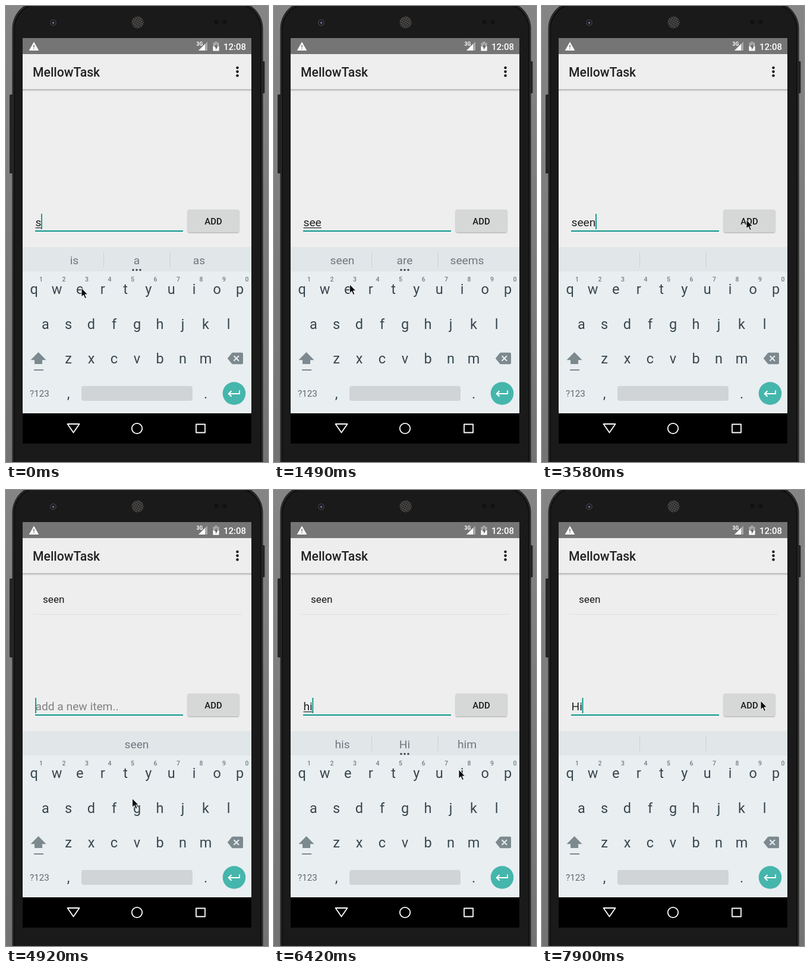
An HTML page that plays this animation: 441x768 px, repeating every 8 s.

```html
<!DOCTYPE html>
<html lang="en">
<head>
<meta charset="utf-8">
<title>Todo list demo</title>
<style>
  html, body { margin: 0; width: 100%; height: 100%; overflow: hidden; background: #7b7b7b; }
  svg { display: block; width: 100%; height: 100%; }
  text { font-family: Roboto, "Noto Sans", sans-serif; white-space: pre; }
  .mid { text-anchor: middle; }
  .key { font-size: 23.5px; fill: #37474f; }
  .digit { font-size: 10.5px; font-weight: 500; fill: #737e83; }
  .word { font-size: 19.2px; fill: #6d797f; }
  .word.bold { font-weight: 700; fill: #37474f; }
</style>
</head>
<body>
<svg id="stage" viewBox="0 0 441 768" xmlns="http://www.w3.org/2000/svg">
  <defs>
    <linearGradient id="drop" x2="0" y2="1">
      <stop stop-color="#000" stop-opacity=".27"/>
      <stop offset="1" stop-color="#000" stop-opacity="0"/>
    </linearGradient>
    <linearGradient id="wall" x2="0" y2="1">
      <stop stop-color="#858585"/>
      <stop offset="1" stop-color="#737373"/>
    </linearGradient>
    <pattern id="mesh" width="3.4" height="3.4" patternUnits="userSpaceOnUse" patternTransform="rotate(30)">
      <rect width="3.4" height="3.4" fill="#4d4b49"/>
      <circle cx="1.7" cy="1.7" r="1.15" fill="#171717"/>
    </pattern>
    <filter id="soft" x="-20%" y="-20%" width="140%" height="140%">
      <feDropShadow dx="0" dy="1" stdDeviation="1" flood-opacity=".32"/>
    </filter>
  </defs>

  <!-- phone body -->
  <rect width="441" height="768" fill="url(#wall)"/>
  <rect x="6" y="149" width="6" height="133" rx="1.5" fill="#262626"/>
  <rect x="430" y="93" width="5.5" height="54" rx="1.5" fill="#262626"/>
  <rect x="10.5" y="-8" width="422" height="830" rx="46" fill="#101010"/>
  <rect x="12" y="-6.5" width="419" height="827" rx="45" fill="none" stroke="#343434" stroke-width="1.5"/>
  <rect x="15" y="-3" width="413" height="820" rx="42" fill="#1a1a1a"/>
  <circle cx="79.5" cy="28" r="5.5" fill="#39393b"/>
  <circle cx="79.5" cy="28" r="3.7" fill="#15161d"/>
  <circle cx="79.5" cy="28.3" r="1.7" fill="#6d7394"/>
  <circle cx="221.5" cy="27.5" r="10" fill="url(#mesh)"/>
  <g fill="#111"><circle cx="354" cy="27" r="3.5"/><circle cx="368" cy="27" r="3.5"/></g>

  <!-- status bar -->
  <rect x="28" y="54" width="385" height="683" fill="#eee"/>
  <rect x="28" y="54" width="385" height="27" fill="#757575"/>
  <path d="M47 60.5L55.3 75H38.7Z" fill="#fff"/>
  <path d="M47 65.5V70M47 71.5V73" stroke="#757575" stroke-width="1.6"/>
  <text x="320.5" y="67" font-size="8.5" font-weight="700" fill="#fff">3G</text>
  <path d="M339 60V75H324Z" fill="#a9a9a9"/>
  <path d="M335 64V75H324Z" fill="#fff"/>
  <path d="M351.5 60H355.5V62H358.5V75.5H348.5V62H351.5Z" fill="#a9a9a9"/>
  <path d="M348.5 68H358.5V75.5H348.5Z" fill="#fff"/>
  <path d="M354.5 63L350.7 69.5H353V74L356.7 67.7H354.5Z" fill="#666"/>
  <text x="366" y="73.5" font-size="15" font-weight="500" fill="#fff">12:08</text>

  <!-- app bar -->
  <rect x="28" y="140" width="385" height="4" fill="url(#drop)"/>
  <text x="45" y="118.7" font-size="21.2" font-weight="500" fill="#212121">MellowTask</text>
  <g fill="#1c1c1c">
    <circle cx="389.5" cy="104" r="2.3"/><circle cx="389.5" cy="110.6" r="2.3"/><circle cx="389.5" cy="117.2" r="2.3"/>
  </g>

  <!-- list and form -->
  <g id="item">
    <path d="M45 209.5H397" stroke="#dfdfdf"/>
    <text x="62" y="189.5" font-size="17.1" fill="#151515">seen</text>
  </g>
  <text id="entry" x="49.5" y="371" font-size="19.2"/>
  <rect id="mark" x="49.5"/>
  <rect id="caret" y="350" width="1.8" height="26" fill="#009688"/>
  <rect x="49" y="378" width="249" height="2" fill="#0a968a"/>
  <rect id="button" x="306" y="343" width="86" height="38" rx="2" filter="url(#soft)"/>
  <text class="mid" x="349" y="368" font-size="14.9" font-weight="500" fill="#1a1a1a">ADD</text>

  <!-- keyboard -->
  <rect x="28" y="406" width="385" height="41" fill="#e1e6e9"/>
  <rect x="28" y="447" width="385" height="239" fill="#e9eef1"/>
  <path id="bars" d="M164.5 414V440M276 414V440" stroke="#cbd1d4"/>
  <g id="words"></g>
  <g id="more" fill="#37474f">
    <circle cx="214" cy="444.5" r="1.7"/><circle cx="220" cy="444.5" r="1.7"/><circle cx="226" cy="444.5" r="1.7"/>
  </g>
  <g id="keys"></g>
  <path d="M54.5 583L67.5 596.2H61V603H48V596.2H41.5Z" fill="#7c898f"/>
  <rect x="47" y="612" width="16" height="2" fill="#7c898f"/>
  <path d="M372.8 593.5L380 584.6Q380.8 583.8 382 583.8H397Q399 583.8 399 585.8V601.2Q399 603.2 397 603.2H382Q380.8 603.2 380 602.4Z" fill="#7c898f"/>
  <path d="M383.5 589.2L392 597.8M392 589.2L383.5 597.8" stroke="#e9eef1" stroke-width="2"/>
  <text x="40" y="658" font-size="15.2" fill="#5c696f">?123</text>
  <rect x="127" y="640" width="187" height="25" rx="4" fill="#d0d4d7"/>
  <circle cx="384" cy="652.5" r="19.3" fill="#45b6ac"/>
  <path d="M393 647.5V653H375M379.5 648.2L374.7 653L379.5 657.8" fill="none" stroke="#fff" stroke-width="2"/>

  <!-- navigation bar -->
  <rect x="28" y="686" width="385" height="51"/>
  <g fill="none" stroke="#fff" stroke-width="1.8" stroke-linejoin="round">
    <path d="M103.5 704H123.5L113.5 718.5Z"/>
    <circle cx="220.5" cy="711.5" r="8.7"/>
    <rect x="320" y="704.5" width="15" height="14"/>
  </g>

  <g id="popup">
    <rect x="-25.5" y="379" width="51" height="121" rx="2" fill="#cdd5d9" filter="url(#soft)"/>
    <text id="letter" class="mid" y="423.5" font-size="38" fill="#37474f"/>
    <g fill="#8c979c">
      <rect x="11.5" y="435.5" width="2" height="2"/><rect x="16" y="435.5" width="2" height="2"/><rect x="20.5" y="435.5" width="2" height="2"/>
    </g>
  </g>
  <path id="pointer" d="M0 0V15L3.4 11.8L6 17.6L8.4 16.5L5.9 10.9H10.6Z" fill="#0a0a0a" stroke="#fff" stroke-width=".9"/>
</svg>
<script>
const $ = id => document.getElementById(id);
const LOOP = 8000, STEP = 150, PITCH = 38.5;

function addText(parent, x, y, cls, str) {
  const el = document.createElementNS("http://www.w3.org/2000/svg", "text");
  el.setAttribute("x", x);
  el.setAttribute("y", y);
  el.setAttribute("class", cls);
  el.textContent = str;
  parent.append(el);
  return el;
}

function addRow(letters, x, y) {
  [...letters].forEach((c, i) => addText($("keys"), x + i * PITCH, y, "mid key", c));
}
addRow("qwertyuiop", 47.2, 485);
addRow("asdfghjkl", 66.5, 543.5);
addRow("zxcvbnm", 105, 602);
addText($("keys"), 105, 661, "mid key", ",");
addText($("keys"), 336, 661, "mid key", ".");
[..."1234567890"].forEach((d, i) => addText($("keys"), 59 + i * PITCH, 464, "mid digit", d));

const words = [115, 220, 325].map(x => addText($("words"), x, 434.5, "mid word", ""));

// Each entry overrides the values before it.
const states = [
  { t: 0, text: "s", mark: "plain", sug: ["is", "a", "as"], bold: false, item: false, popup: "", press: false },
  { t: 150, text: "se", popup: "e" },
  { t: 300, popup: "", sug: ["se", "we", "set"], bold: true, mark: "fix" },
  { t: 750, text: "see", popup: "e" },
  { t: 890, popup: "", sug: ["seen", "are", "seems"], bold: false, mark: "plain" },
  { t: 2980, text: "seen", mark: "", sug: ["", "", ""] },
  { t: 3880, press: true },
  { t: 4030, text: "", item: true, sug: ["", "seen", ""] },
  { t: 4180, press: false },
  { t: 5520, text: "h", mark: "plain", sug: ["he", "a", "has"] },
  { t: 6270, text: "hi", popup: "i" },
  { t: 6420, popup: "", sug: ["his", "Hi", "him"] },
  { t: 7450, text: "Hi", mark: "", sug: ["", "", ""] }
];

const caretOff = [[1340, 1840], [2340, 2980], [3640, 4030], [4380, 4880], [5380, 5520], [6020, 6270], [6770, 7270]];

// Pointer moves: start, end, x, y
const home = [127, 475];
const moves = [
  [150, 450, 127, 472],
  [1340, 2240, 132, 429],
  [2980, 3580, 344, 360],
  [4180, 4920, 212.5, 519.5],
  [5070, 5370, 258, 532],
  [5670, 6120, 311, 471],
  [6570, 7310, 220, 434],
  [7450, 7900, 368, 355]
];

function pointerAt(t) {
  let [x, y] = home;
  for (const [from, to, nx, ny] of moves) {
    if (t < from) break;
    const held = Math.floor((t - from) / STEP + 1e-6) * STEP;
    const p = t >= to ? 1 : held / (to - from);
    const e = p * p * (3 - 2 * p);
    x += (nx - x) * e;
    y += (ny - y) * e;
  }
  return [x, y];
}

const show = (id, on) => $(id).setAttribute("visibility", on ? "visible" : "hidden");

let last = -1;
function apply(index) {
  const s = Object.assign({}, ...states.slice(0, index + 1));
  const entry = $("entry"), mark = $("mark");
  entry.textContent = s.text || "add a new item..";
  entry.setAttribute("fill", s.text ? "#212121" : "#818181");
  const width = s.text ? entry.getComputedTextLength() : 0;
  $("caret").setAttribute("x", 49.2 + width);
  const fix = s.mark === "fix";
  mark.setAttribute("y", fix ? 372.5 : 373);
  mark.setAttribute("width", s.mark ? width : 0);
  mark.setAttribute("height", fix ? 2 : 1.2);
  mark.setAttribute("fill", fix ? "#33a5d0" : "#212121");
  words.forEach((w, i) => {
    w.textContent = s.sug[i];
    w.classList.toggle("bold", s.bold && i === 1);
  });
  const alone = s.sug[1] && !s.sug[0];
  show("bars", !alone);
  show("more", s.sug[0]);
  show("item", s.item);
  $("button").setAttribute("fill", s.press ? "#c9caca" : "#d6d7d7");
  show("popup", s.popup);
  if (s.popup) {
    const col = "qwertyuiop".indexOf(s.popup);
    $("letter").textContent = s.popup;
    $("popup").setAttribute("transform", `translate(${47.5 + col * PITCH} 0)`);
  }
}

function draw(t) {
  const index = states.findLastIndex(s => t >= s.t);
  if (index !== last) apply(last = index);
  show("caret", !caretOff.some(([a, b]) => t >= a && t < b));
  $("pointer").setAttribute("transform", `translate(${pointerAt(t)})`);
}

const start = performance.now();
function tick() {
  draw((performance.now() - start) % LOOP);
  requestAnimationFrame(tick);
}
tick();
</script>
</body>
</html>
```
